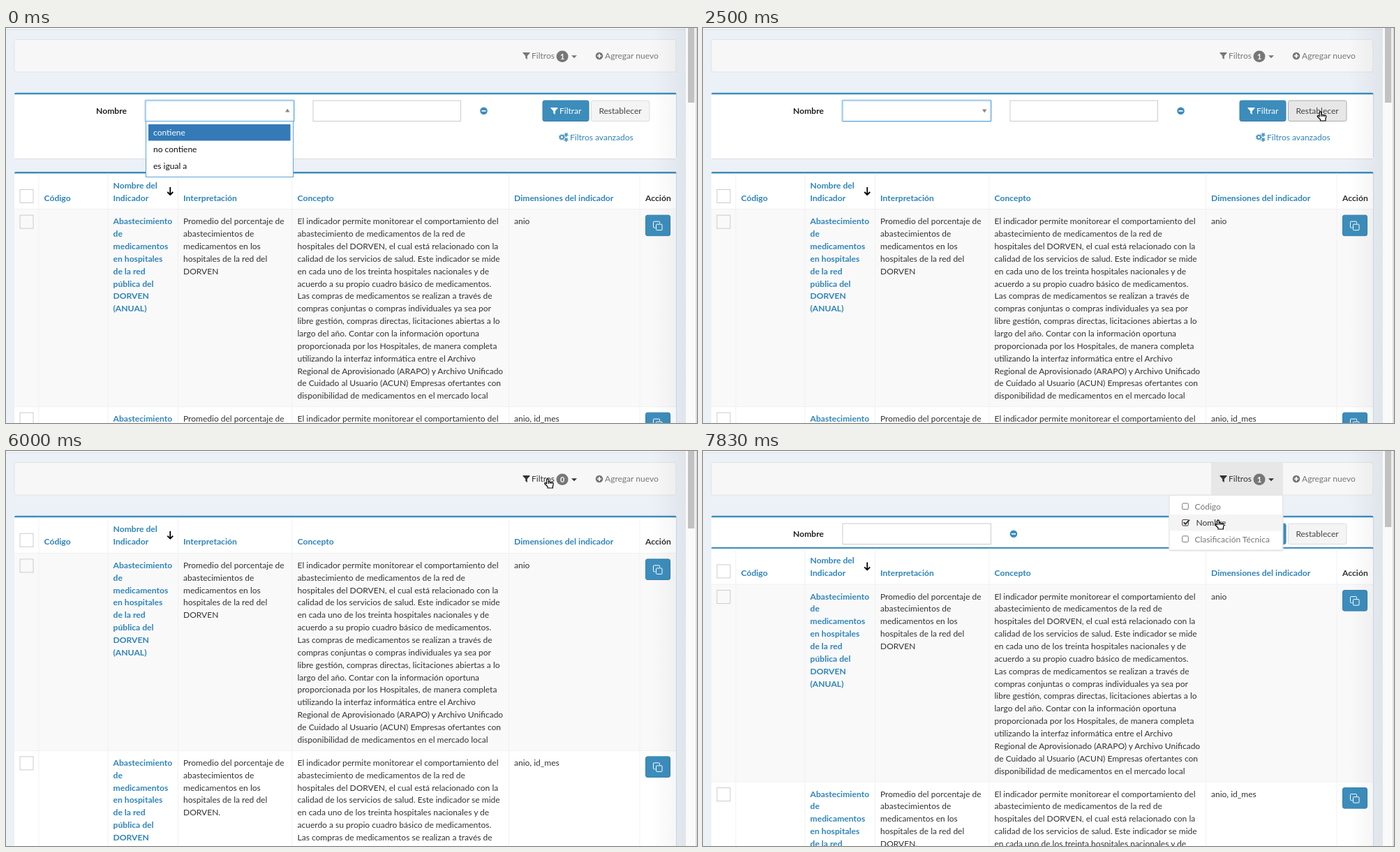
Recreate the animation shown at these times as an HTML page. Size 990x566 px, loop 8000 ms.

```html
<!DOCTYPE html>
<html lang="es">
<head>
<meta charset="utf-8">
<title>Filtros de indicadores</title>
<style>
html, body { margin: 0; width: 100%; height: 100%; overflow: hidden; background: #ecf0f7; }
svg { display: block; font: 12.03px Lato, "Open Sans", sans-serif; }
text { white-space: pre; }
.bold { font-weight: 700; font-size: 12.15px; }
</style>
</head>
<body>
<svg id="stage" width="990" height="566" viewBox="0 0 990 566"></svg>
<script>
const LOOP = 8000, FPS = 6, LINE = 17.86;
const BLUE = '#3c8dbc', LINK = '#2f84b8', DARK = '#333', GREY = '#777';

const CONCEPT = `El indicador permite monitorear el comportamiento del
abastecimiento de medicamentos de la red de
hospitales del DORVEN, el cual está relacionado con la
calidad de los servicios de salud. Este indicador se mide
en cada uno de los treinta hospitales nacionales y de
acuerdo a su propio cuadro básico de medicamentos.
Las compras de medicamentos se realizan a través de
compras conjuntas o compras individuales ya sea por
libre gestión, compras directas, licitaciones abiertas a lo
largo del año. Contar con la información oportuna
proporcionada por los Hospitales, de manera completa
utilizando la interfaz informática entre el Archivo
Regional de Aprovisionado (ARAPO) y Archivo Unificado
de Cuidado al Usuario (ACUN) Empresas ofertantes con
disponibilidad de medicamentos en el mercado local`;
const NAME = `Abastecimiento
de
medicamentos
en hospitales
de la red
pública del
DORVEN
`;
const MEANING = `Promedio del porcentaje de
abastecimientos de
medicamentos en los
hospitales de la red del
DORVEN`;

// Drawing helpers
const rect = (x, y, w, h, fill, stroke = 'none', r = 0) =>
  `<rect x="${x}" y="${y}" width="${w}" height="${h}" rx="${r}" fill="${fill}" stroke="${stroke}"/>`;
const path = (d, fill, stroke = 'none', width = 1) =>
  `<path d="${d}" fill="${fill}" stroke="${stroke}" stroke-width="${width}" stroke-linejoin="round"/>`;
const at = (x, y, content) => `<g transform="translate(${x} ${y})">${content}</g>`;
const text = (x, y, s, fill = DARK, extra = '') => `<text x="${x}" y="${y}" fill="${fill}" ${extra}>${s}</text>`;
const bold = (x, y, s, fill = LINK) => text(x, y, s, fill, 'class="bold"');
const lines = (x, y, s, draw = text) => s.split('\n').map((l, i) => draw(x, y + i * LINE, l)).join('');
const funnel = (x, y, fill) => at(x, y, path('M0 0H10V1L6.3 5V10L3.7 8V5L0 1Z', fill));
const disc = (x, y, fill, sign) =>
  `<circle cx="${x}" cy="${y}" r="5.3" fill="${fill}"/>` + at(x, y, path(sign, 'none', '#fff', 1.7));
const gear = (x, y, r) =>
  `<circle cx="${x}" cy="${y}" r="${r}" fill="none" stroke="${BLUE}" stroke-width="1.6"/>` +
  `<circle cx="${x}" cy="${y}" r="${r + 1.3}" fill="none" stroke="${BLUE}" stroke-width="1.2" stroke-dasharray="1.5 1.6"/>`;
const panel = (y, bottom) =>
  rect(12, y + 1, 948.5, bottom - y, '#d8dce1', 'none', 3) +
  rect(12, y, 948.5, bottom - y, BLUE, 'none', 2) + rect(12, y + 2.5, 948.5, bottom - y - 2.5, '#fff');

function toolbar(count, hover, open) {
  const ink = hover ? DARK : GREY;
  return rect(12, 16.5, 948, 46.5, '#f7f7f7', '#e3e3e3', 3) +
    (open ? rect(728, 17, 103, 46, '#e7e7e7') : '') +
    funnel(740.5, 35, ink) + text(753, 44, 'Filtros', ink) +
    rect(788.5, 32.5, 17, 16.5, GREY, 'none', 8.2) +
    text(797, 44.7, count, '#fff', 'font-weight="700" font-size="10.7" text-anchor="middle"') +
    path('M810 39.3H818L814 43.3Z', ink) +
    disc(850, 40, GREY, 'M-3 0H3M0-3V3') + text(858, 44, 'Agregar nuevo', GREY);
}

function tableRow(y, suffix, end, dims, fill) {
  return rect(12, y, 948, 283, fill) + path(`M12 ${y}H960`, 'none', '#f1f1f1') +
    rect(20, y + 8.5, 19, 19, fill, '#ccc') +
    lines(153.5, y + 21.5, NAME + suffix, bold) +
    lines(254, y + 21.5, MEANING + end) + lines(417.5, y + 21.5, CONCEPT) + text(728, y + 21.5, dims) +
    rect(916.5, y + 8.5, 35, 29.5, BLUE, '#367fa9', 2.5) +
    at(927.5, y + 17.5, rect(4, 4, 8.5, 8.5, 'none', '#fff', 1) + path('M3 9H1Q0 9 0 8V1Q0 0 1 0H8Q9 0 9 1V3', 'none', '#fff'));
}

function table() {
  const heads = [[54.5, 'Código'], [254, 'Interpretación'], [417.5, 'Concepto'], [728, 'Dimensiones del indicador']];
  return panel(206, 900) + rect(20, 231.5, 19, 19, '#fff', '#ccc') +
    heads.map(([x, s]) => bold(x, 247.5, s)).join('') +
    lines(153.5, 229.7, 'Nombre del\nIndicador', bold) + bold(916, 247.5, 'Acción', DARK) +
    path('M235.3 228V239M231.3 235L235.3 239 239.3 235', 'none', '#000', 1.8) +
    tableRow(259.7, '(ANUAL)', '', 'anio', '#f9f9f9') +
    tableRow(542.7, '(MENSUAL)', '.', 'anio, id_mes', '#fff') +
    [47, 146, 246.5, 410, 720.5, 908].map(x => path(`M${x} 208.5V900`, 'none', '#f1f1f1')).join('');
}

function filterPanel(advanced, list, focus, hover) {
  const edge = list || focus ? '#5aa5dc' : '#aaa';
  const minus = x => disc(x, 118.8, BLUE, 'M-3 0H3');
  let s = panel(92.7, advanced ? 187 : 137) + bold(129, 123.3, 'Nombre', '#222');
  if (advanced) {
    if (focus) s += rect(198.5, 102.5, 215, 32, 'none', '#cfe6f7', 2);
    s += rect(200, 104, 212.5, 29.5, '#fff', edge) +
      path(list ? 'M400 120.5H406.5L403.2 115.5Z' : 'M400 116.5H406.5L403.2 121.5Z', '#888') +
      rect(440, 104, 211.5, 29.5, '#fff', '#ccc') + minus(684.5) +
      gear(796.3, 156.5, 2.5) + gear(802.5, 153, 1.2) + gear(802.5, 160, 1.2) +
      text(808, 160.7, 'Filtros avanzados', LINK);
  } else {
    s += rect(200, 104, 212.5, 29.5, '#fff', '#ccc') + minus(445);
  }
  s += rect(769, 104, 66, 29.5, BLUE, '#367fa9', 2.5) + funnel(780.5, 114, '#fff') + text(793, 123.3, 'Filtrar', '#fff') +
    rect(838.5, 104, 83.5, 29.5, hover ? '#e7e7e7' : '#f4f4f4', hover ? '#adadad' : '#ddd', 2.5) +
    text(880, 123.3, 'Restablecer', '#444', 'text-anchor="middle"');
  return s;
}

const optionList = () =>
  rect(200.5, 133.5, 211, 80, '#fff', '#5aa5dc') + rect(204, 138, 203.5, 23.5, '#337ab7') +
  text(211, 153.7, 'contiene', '#fff') + text(211, 177.8, 'no contiene', '#111') + text(211, 202, 'es igual a', '#111');

function menu(hover, checked) {
  let s = rect(667.5, 64, 164, 79.5, '#dfe2e6', 'none', 2) + rect(668, 63.5, 162.5, 78.5, '#fff', '#e4e4e4');
  if (hover) s += rect(668, 91, 162.5, 23.5, '#f4f4f4');
  ['Código', 'Nombre', 'Clasificación Técnica'].forEach((label, i) => {
    const y = 79.3 + i * 23.4, active = i === 1, ink = active && hover ? DARK : GREY;
    s += rect(686.7, y - 4.3, 8.6, 8.6, 'none', ink, 1.5) +
      text(active && checked ? 706.5 : 704.5, y + 4.4, label, ink);
    if (active && checked) s += path(`M688.7 ${y - 0.5}L691.3 ${y + 2} 697 ${y - 4}`, 'none', ink, 1.9);
  });
  return s;
}

const edges = thumb =>
  rect(0, 0, 974, 1.5, '#fbfbfc') + path('M0 2H974', 'none', '#dde2ea') +
  rect(925, 0, 49, 566, 'url(#shade)') + rect(974, 0, 14, 566, '#fafafa') +
  rect(977, -4, 9.3, thumb + 4, '#c1c1c1') + rect(988, 0, 2, 566, '#dcdcde');

// Pointer moves: first step, last step, from, to
const MOVES = [
  [2, 8, 95, 0, 741.5, 100],
  [8, 12, 741.5, 100, 884.5, 119],
  [32, 36, 885.5, 119, 776, 39],
  [40, 43, 776, 39, 738, 98]
];

function pointer(step) {
  const move = MOVES.filter(m => step >= m[0]).pop();
  if (!move) return '';
  const [a, b, x0, y0, x1, y1] = move;
  const k = Math.min(1, (step - a) / (b - a)), e = k * k * (3 - 2 * k);
  const hand = (step >= 15 && step < 22) || (step >= 30 && step < 33) || step >= 36;
  return at(x0 + (x1 - x0) * e, y0 + (y1 - y0) * e, hand
    ? path('M-1.3 1.5Q0 .2 1.3 1.5V5L7 6Q8.6 6.5 8.3 8.2L7.4 11.5V14H0V12L-4 8.3Q-4.7 6.8-3.3 6.4L-1.3 7.8ZM1.3 5V8M3.7 5.6V8M6 6V8', '#fff', '#000', 1.2)
    : path('M.5 .8V15.4L3.9 12.3 6.3 17.7 8.6 16.7 6.2 11.4H10.7Z', '#fff', '#111', 1.2));
}

function scene(step) {
  const cleared = step >= 30, checked = step >= 46, open = step >= 39, list = step < 14;
  const shift = checked ? -68.6 : cleared ? -113.3 : 0;
  return `<defs><linearGradient id="shade"><stop stop-opacity="0"/><stop offset="1" stop-opacity=".05"/></linearGradient></defs>` +
    rect(0, 0, 990, 566, '#ecf0f7') +
    toolbar(cleared && !checked ? 0 : 1, step >= 36, open) +
    at(0, shift, table()) +
    (!cleared || checked ? filterPanel(!checked, list, step < 22, step >= 15 && !checked) : '') +
    (list ? optionList() : '') +
    edges(checked ? 109 : cleared ? 111 : 107) +
    (open ? menu(step >= 42, checked) : '') + pointer(step);
}

const stage = document.getElementById('stage');
let shown = -1;
function tick() {
  const step = Math.floor((performance.now() % LOOP + 5) / 1000 * FPS) % (LOOP / 1000 * FPS);
  if (step !== shown) stage.innerHTML = scene(shown = step);
  requestAnimationFrame(tick);
}
tick();
</script>
</body>
</html>
```
